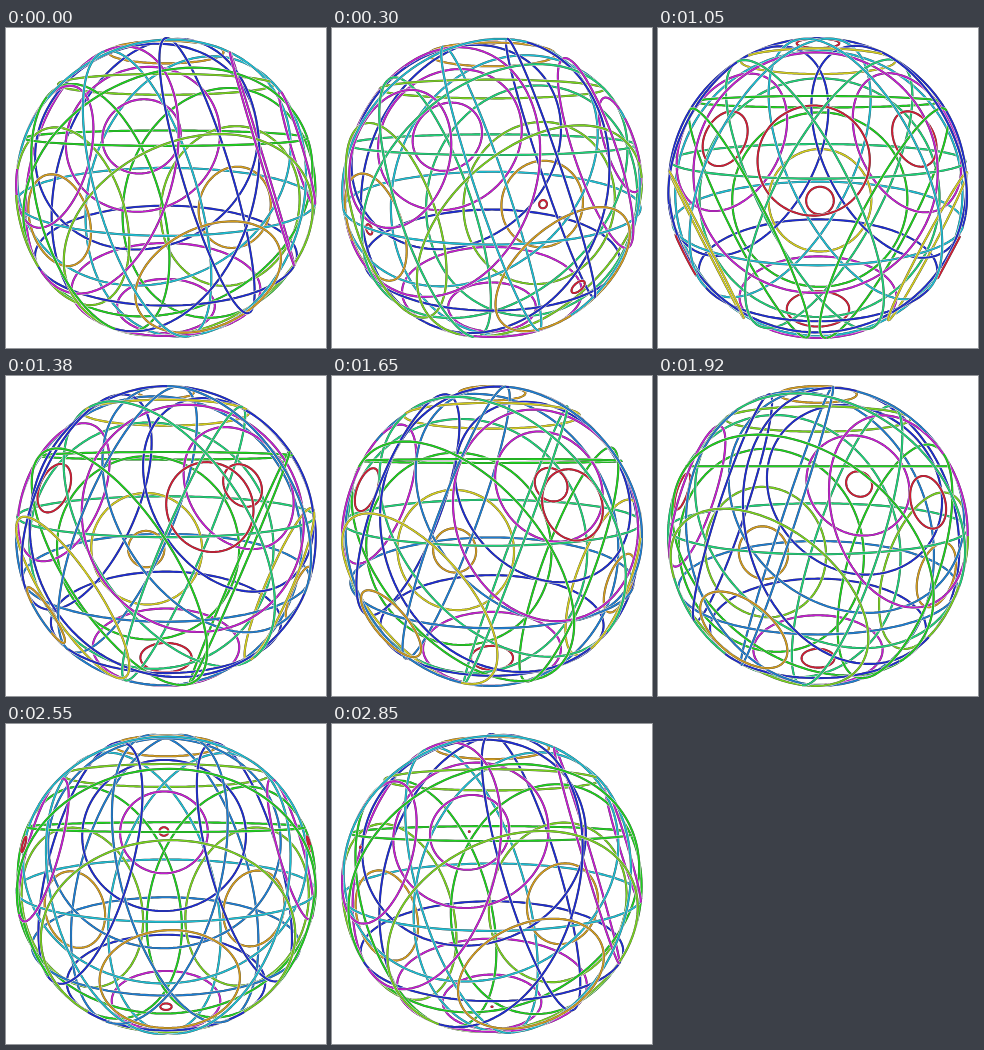
An HTML page with a canvas that plays this animation: 320 px wide and 320 px high, repeating every 2.88 s.

```html
<!DOCTYPE html>
<html lang="en">
<head>
<meta charset="utf-8">
<title>Circles sweeping a sphere</title>
<style>
  html, body { margin: 0; width: 100%; height: 100%; overflow: hidden; background: #fff; }
  canvas { display: block; width: 320px; height: 320px; }
</style>
</head>
<body>
<canvas id="stage" width="320" height="320"></canvas>
<script>
const ctx = document.getElementById('stage').getContext('2d');
const LOOP = 2880, STEP = 30;
const RAD = Math.PI / 180;
const CENTER = 160, RADIUS = 150;
const CAMERA = 2.4;                              // eye distance in sphere radii
const FOCAL = RADIUS * Math.sqrt(CAMERA * CAMERA - 1);
const TILT = 12 * RAD;
const RINGS = 8, SEGMENTS = 144;
const HUES = [352, 42, 58, 90, 120, 150, 187, 208, 235, 296];

const mix = (a, p, b, q) => a.map((v, i) => v * p + b[i] * q);
const cross = (a, b) => [
  a[1] * b[2] - a[2] * b[1],
  a[2] * b[0] - a[0] * b[2],
  a[0] * b[1] - a[1] * b[0]
];

const right = [1, 0, 0];
const up = [0, Math.cos(TILT), Math.sin(TILT)];
const away = [0, Math.sin(TILT), -Math.cos(TILT)];

// Four tetrahedral axes: the spin axis and three around it.
function axes(turn) {
  const list = [{ u: up, e: right }];
  for (let k = 0; k < 3; k++) {
    const phi = (45 + 120 * (k - turn)) * RAD;
    const out = mix(away, Math.cos(phi), right, Math.sin(phi));
    const side = mix(away, -Math.sin(phi), right, Math.cos(phi));
    list.push({ u: mix(up, -1 / 3, out, Math.sqrt(8) / 3), e: side });
  }
  return list;
}

function project(p) {
  const s = FOCAL / (CAMERA - p[2]);
  return [CENTER + p[0] * s, CENTER - p[1] * s];
}

// Snap the full hue circle, spread from pole to pole, to the palette.
function colorAt(angle) {
  const hue = 2 * angle / RAD;
  const gap = h => Math.abs((hue - h + 540) % 360 - 180);
  const best = HUES.reduce((a, b) => gap(b) < gap(a) ? b : a);
  return `hsl(${best}, 76%, 47%)`;
}

function makeCircle({ u, e }, angle) {
  const f = cross(u, e);
  const points = [], near = [];
  for (let i = 0; i <= 2 * SEGMENTS; i++) {
    const w = i * Math.PI / SEGMENTS;
    const rim = mix(e, Math.cos(w), f, Math.sin(w));
    const p = mix(u, Math.cos(angle), rim, Math.sin(angle));
    if (i % 2) near.push(p[2] > 1 / CAMERA);
    else points.push(project(p));
  }
  return { points, near, color: colorAt(angle) };
}

function strokeSide({ points, near, color }, front) {
  ctx.beginPath();
  let open = false;
  near.forEach((n, i) => {
    if (n === front) {
      if (!open) ctx.moveTo(...points[i]);
      ctx.lineTo(...points[i + 1]);
    }
    open = n === front;
  });
  const layers = [['#fff', 3], ['rgba(0, 0, 0, 0.75)', 2.1], [color, 1.6]];
  for (const [style, width] of layers) {
    ctx.strokeStyle = style;
    ctx.lineWidth = width;
    ctx.stroke();
  }
}

function draw(time) {
  const turn = time / LOOP;
  const circles = [];
  for (const axis of axes(turn)) {
    for (let j = 0; j < RINGS; j++) {
      const angle = (j + turn) * Math.PI / RINGS;
      if (angle > 0) circles.push(makeCircle(axis, angle));
    }
  }
  ctx.fillStyle = '#fff';
  ctx.fillRect(0, 0, 320, 320);
  ctx.lineJoin = 'round';
  for (const front of [false, true]) {
    for (const c of circles) strokeSide(c, front);
  }
}

const start = performance.now();
function tick() {
  const t = (performance.now() - start) % LOOP;
  draw(Math.floor(t / STEP) * STEP);
  requestAnimationFrame(tick);
}
tick();
</script>
</body>
</html>
```
